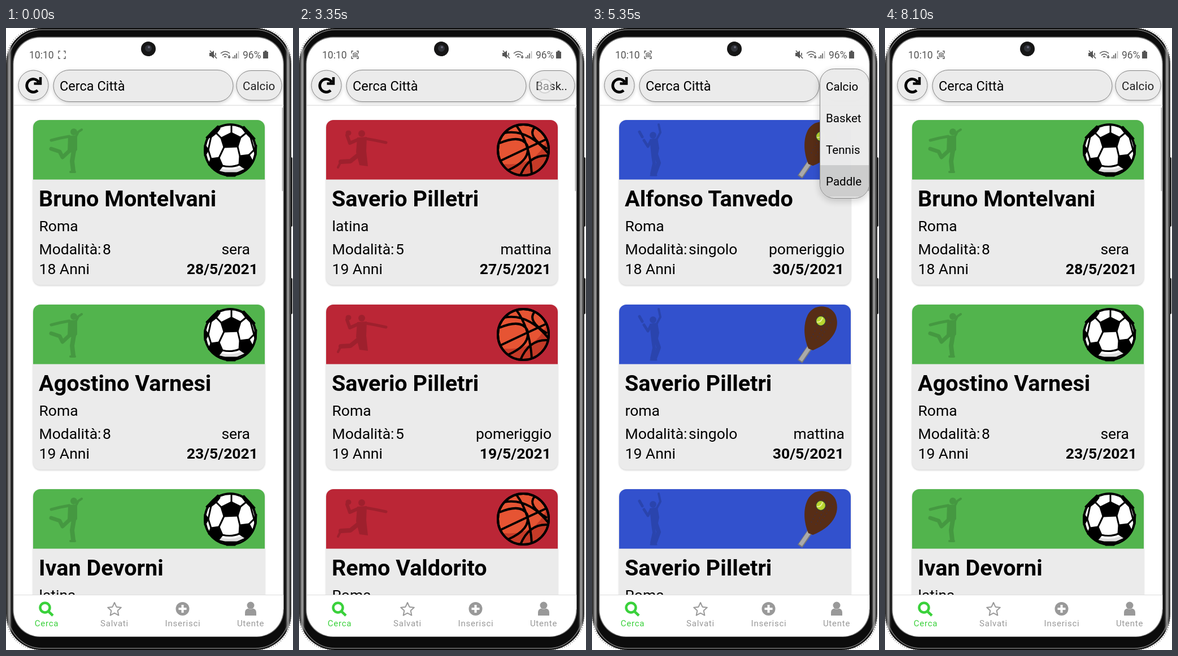
Animation of 508 by 1102 pixels, one loop 8.15 s. Source, as an HTML page:

```html
<!DOCTYPE html>
<html lang="it">
<head>
<meta charset="utf-8">
<style>
  html, body { margin: 0; width: 100%; height: 100%; overflow: hidden; background: #fff; }
  svg { display: block; width: 100vw; height: 100vh; font-family: Roboto, sans-serif; }
  .pill { fill: #ebebeb; stroke: #858585; filter: drop-shadow(0 2px 3px #0003); }
  .card { fill: #ebebeb; filter: drop-shadow(0 1.5px 1.5px #0003); }
  .name { font: 700 39.6px Roboto, sans-serif; }
  .info { font-size: 26.5px; }
  .date { font-weight: 700; }
  .item { font-size: 20.6px; }
  .tab { font-size: 15px; letter-spacing: .75px; text-anchor: middle; }
  .fig { stroke-linecap: round; stroke-linejoin: round; }
  .end { text-anchor: end; }
</style>
</head>
<body>
<svg id="stage" viewBox="0 0 508 1102"></svg>
<script>
const LOOP = 8150;

// Silhouettes: head, torso and [width, limb] strokes
const figure = (head, torso, ...limbs) =>
  `<g class="fig" opacity=".15"><circle cx="${head[0]}" cy="${head[1]}" r="6"/><path d="${torso}"/>` +
  limbs.map(([w, d]) => `<path d="${d}" fill="none" stroke="#000" stroke-width="${w}"/>`).join('') + '</g>';

const soccerBall = `<g transform="translate(397 216)">
  <circle r="47"/><circle r="43" fill="#fff"/>
  <path d="M-36 24Q0 48 38 20Q28 43 0 43Q-27 43-36 24z" fill="#ddd"/>
  <g stroke="#000" stroke-width="3" stroke-linejoin="round">
  <path d="M-16-21 2-30 18-22 13-6-11-5z M-20 14-14 28-22 38-38 26-34 16z M17 11 33 9 39 20 28 34 16 26z
    M-25-30-34-23-42-22-22-42-19-38z M28-30 36-22 43-20 24-41 22-38z M-45-8-39 0-45 10z M46-8 42 0 45 9z M-10 41 12 41 8 46-6 46z"/>
  <path fill="none" d="M-16-21-25-30M18-22 28-30M2-30V-45M-11-5-20 14M13-6 17 11M-14 28Q2 32 16 26M-34 16-39 0-34-23M33 9 42 0 36-22M-22 38-10 41M28 34 12 41"/></g></g>`;

const basketBall = `<g transform="translate(397 216)" fill="none" stroke="#000" stroke-width="4">
  <circle r="45" fill="#e65433"/>
  <path d="M41-17A44 44 0 0 1-36 25Q22 30 41-17z" fill="#c53a27" stroke="none"/>
  <path d="M-42 20Q0 0 41-19M-12-43Q12-10 15 43M-42-12Q-4-28 7-8Q14 18-27 36M-34-30Q8-38 44 6M20-40Q6-24 42-2M-5 45Q10 8 44 10"/>
  <circle r="45"/></g>`;

const tennisBall = (x, y) => `<circle cx="${x}" cy="${y}" r="8.5" fill="#b9d62f" stroke="#343" stroke-width="1.2"/>
  <path d="M${x - 7} ${y + 2}q8 1 10-8" fill="none" stroke="#eef5b0" stroke-width="1.5"/>`;

const racket = `<g transform="translate(409 198) rotate(28)" fill="none">
  <path d="M-17 18 0 46 17 18" stroke="#858788" stroke-width="6"/>
  <ellipse rx="21" ry="28" fill="url(#strings)" stroke="#858788" stroke-width="5"/>
  <path d="M-21-3A21 28 0 0 1 21-3" stroke="#29ae9b" stroke-width="5"/>
  <path d="M0 42V50" stroke="#858788" stroke-width="8"/>
  <path d="M0 49V77" stroke="#263f91" stroke-width="10"/>
  <path d="M0 50V76" stroke="#416bd0" stroke-width="9" stroke-dasharray="4 2"/></g>` + tennisBall(408, 189);

const paddle = `<path d="M388 235 368 264" stroke="#777" stroke-width="10"/>
  <path d="M386 237 369 262" stroke="#aaa" stroke-width="7"/>
  <path d="M383 241C375 222 373 199 382 181C393 161 421 162 431 181C441 206 424 231 391 244z" fill="#572d16"/>
  <path d="M388 222 414 174M396 226 422 180M404 223 428 187" stroke="#35304f" stroke-width="1.5" stroke-dasharray="1.5 5"/>` + tennisBall(405, 192);

// Cards: name, city, mode, time of day, age, date
const sports = [
  { label: 'Calcio', color: '#52b44d', art: soccerBall,
    fig: figure([120, 184], 'M110 191 126 190 126 216 121 222 109 219z',
      [5, 'M112 192 96 195 80 199'], [4, 'M124 192 128 184 134 180'],
      [8, 'M120 218 117 236 119 253'], [7, 'M113 217 100 229 95 219 80 214'], [4, 'M114 255H122']),
    cards: [['Bruno Montelvani', 'Roma', '8', 'sera', '18 Anni', '28/5/2021'],
      ['Agostino Varnesi', 'Roma', '8', 'sera', '19 Anni', '23/5/2021'], ['Ivan Devorni', 'latina']] },
  { label: 'Bask..', color: '#bb2636', art: basketBall,
    fig: figure([111, 187], 'M103 194 120 193 119 218 122 245 107 243 101 220z',
      [6, 'M106 197 90 204 85 190'], [9, 'M87 186h1'], [5, 'M118 196 135 199 154 203'],
      [8, 'M106 224 91 236 74 237'], [4, 'M74 237 69 247']),
    cards: [['Saverio Pilletri', 'latina', '5', 'mattina', '19 Anni', '27/5/2021'],
      ['Saverio Pilletri', 'Roma', '5', 'pomeriggio', '19 Anni', '19/5/2021'], ['Remo Valdorito', 'Roma']] },
  { label: 'Tenn..', color: '#cb6e2e', art: racket,
    fig: figure([107, 190], 'M95 197 111 196 112 217 108 229 92 224z',
      [5, 'M97 199 87 207 77 192'], [5, 'M110 200 115 214 132 217'], [1.5, 'M133 217a7 5 0 1 1 13-1a7 5 0 1 1-13 1M134 215H145'],
      [8, 'M97 222 86 235 70 239'], [5, 'M70 239 64 250'], [8, 'M105 222 117 234 124 249'], [4, 'M122 251h8']),
    cards: [['Ettore Grandovesi', 'Roma', 'singolo', 'mattina', '18 Anni', '29/5/2021'],
      ['Salvatore Mevadi', 'Milano', 'singolo', 'pomeriggio', '0', '19/5/2021']] },
  { label: 'Padd..', color: '#3251cd', art: paddle,
    fig: figure([108, 190], 'M102 197 116 195 119 213 116 228 105 226z',
      [5, 'M104 200 99 210 92 199'], [5, 'M84 184 89 193'], [4, 'M114 198 121 185 118 171'],
      [8, 'M113 224 118 239 111 258'], [6, 'M108 226 110 240 106 258'], [3, 'M104 261h10']),
    cards: [['Alfonso Tanvedo', 'Roma', 'singolo', 'pomeriggio', '18 Anni', '30/5/2021'],
      ['Saverio Pilletri', 'roma', 'singolo', 'mattina', '19 Anni', '30/5/2021'], ['Saverio Pilletri', 'Roma']] },
];

const text = (x, y, cls, s) => `<text x="${x}" y="${y}" class="${cls}">${s}</text>`;

const card = (sport, [name, city, mode = '', part = '', age = '', date = ''], i) => `<g transform="translate(0 ${327 * i})">
  <rect class="card" x="48" y="163" width="410" height="292.5" rx="13"/>
  <path d="M48 268.5V176a13 13 0 0 1 13-13H445a13 13 0 0 1 13 13V268.5z" fill="${sport.color}"/>
  ${sport.fig}${sport.art}
  ${text(58, 316, 'name', name)}${text(58.5, 360, 'info', city)}
  ${text(58.5, 401, 'info', 'Modalità:')}${text(171, 401, 'info', mode)}${text(58.5, 436, 'info', age)}
  ${text(part === 'sera' ? 432 : 447, 401, 'info end', part)}${text(446, 436, 'info date end', date)}</g>`;

const star = Array.from({ length: 10 }, (_, k) => {
  const a = k * Math.PI / 5, r = k % 2 ? 6 : 12.5;
  return `${192 + r * Math.sin(a)},${1030.5 - r * Math.cos(a)}`;
}).join(' ');

const ring = (x, y, w, h, r, fill) => `<rect x="${x}" y="${y}" width="${w}" height="${h}" rx="${r}" fill="${fill}"/>`;

// Metal edge: the same shading mirrored on both sides
const edge = [[0, '#2a2a2a'], [3, '#4a4a4a'], [5, '#a8a8a8'], [7, '#8a8a8a'], [9.5, '#222'], [12, '#0c0c0c']];
const edgeStops = edge.map(([x, c]) => `<stop offset="${x / 252.5}" stop-color="${c}"/>`).join('');

const phone = `
  <rect x="1" y="1" width="503" height="1100" rx="56" fill="none" stroke="#777" stroke-width="2" stroke-dasharray="1 3"/>
  ${ring(501, 229, 6, 123, 2, '#181818')}${ring(501, 443, 6, 64, 2, '#181818')}
  ${ring(0, 0, 505, 1102, 64, 'url(#metal)')}
  <rect x="4" y="3" width="497" height="1096" rx="60" fill="none" stroke="#777" stroke-width="1.5"/>
  ${ring(12, 15.5, 480, 1063.5, 48, '#777')}${ring(13.5, 17, 477, 1061, 47, '#fff')}
  <circle cx="252" cy="37" r="13" fill="#161616"/><circle cx="252" cy="36" r="6" fill="#303238"/><circle cx="253" cy="34" r="2" fill="#667"/>`;

const status = `<g fill="#555" font-size="17.5">
  <text x="41" y="54">10:10</text><text x="419" y="54">96%</text>
  <path d="M455 42h2.5v-2h4v2H464V54H455z"/>
  <path d="M360 44h3l5-4V54l-5-4h-3z"/>
  <g fill="none" stroke="#555" stroke-width="1.6">
    <path d="M361 40 373 54M371 44v5"/>
    <path d="M380 45Q388 38 396 45M383 48.5Q388 44 393 48.5M386 51.5Q388 50 390 51.5M395 48v6M392.5 51.5h5"/>
    <path d="M402 54v-3M405 54v-6M408 54v-9"/><path d="M411.5 54V41" stroke="#bbb"/>
    <path d="M93 45v-4h3M102 41h3v4M105 50v4h-3M96 54h-3v-4" stroke-width="1.3"/>
    <path id="shot" d="M96 45h1.5l1-1h2l1 1H103v6H96zM98 48a1.5 1.5 0 1 0 3 0a1.5 1.5 0 1 0-3 0" stroke-width="1.2"/>
  </g></g>`;

const header = `<path d="M14 137H491" stroke="#e9e9e9" stroke-width="2"/>
  <circle class="pill" cx="48.5" cy="101.5" r="26.5"/>
  <g fill="none" stroke="#000"><path d="M58 96A11.5 11.5 0 1 0 56 110.5" stroke-width="4.8"/><path d="M61 87V98.5H49.5" stroke-width="4.5"/></g>
  <rect class="pill" x="84" y="74.5" width="318" height="56" rx="28"/><text x="95" y="111" font-size="23.5">Cerca Città</text>
  <rect class="pill" x="408" y="75.5" width="80" height="52.5" rx="26"/>
  <text id="chosen" x="419" y="109.5" font-size="20.6" fill="#222"></text>
  <circle id="touch" cx="435" cy="103" r="12" fill="#fff9" stroke="#ccc" stroke-width="2"/>`;

const tabs = `<rect x="14" y="1004" width="477" height="26" fill="#fff"/><path d="M14 1004.5H491" stroke="#ddd"/>
  <g fill="#999">
  <g fill="#3ad13b">${text(72, 1060, 'tab', 'Cerca')}
    <path d="M74.5 1033 83 1041M60.5 1027a8.5 8.5 0 1 0 17 0a8.5 8.5 0 1 0-17 0" fill="none" stroke="#3ad13b" stroke-width="4.5"/></g>
  ${text(192, 1060, 'tab', 'Salvati')}<polygon points="${star}" fill="none" stroke="#999" stroke-width="2" stroke-linejoin="round"/>
  ${text(313, 1060, 'tab', 'Inserisci')}<circle cx="312.5" cy="1029" r="12"/><path d="M305.5 1029h14M312.5 1022v14" stroke="#fff" stroke-width="4"/>
  ${text(433, 1060, 'tab', 'Utente')}<circle cx="433" cy="1023" r="6.5"/><path d="M423 1041V1036Q423 1029 429 1028.5Q433 1031 437 1028.5Q443 1029 443 1036V1041z"/></g>`;

const menu = `<g id="menu"><rect class="pill" x="403.5" y="72.5" width="87" height="229" rx="25" style="filter:drop-shadow(0 4px 7px #0003)"/>
  <rect id="pick" x="404" y="0" width="86" height="56" fill="#cdcdcd" clip-path="url(#menuClip)"/>
  ${['Calcio', 'Basket', 'Tennis', 'Paddle'].map((s, i) => text(414, 111 + 56 * i, 'item', s)).join('')}</g>`;

stage.innerHTML = `<defs>
  <linearGradient id="metal" gradientUnits="userSpaceOnUse" x1="0" x2="252.5" spreadMethod="reflect">${edgeStops}</linearGradient>
  <clipPath id="list"><rect x="14" y="138" width="477" height="866"/></clipPath>
  <clipPath id="menuClip"><rect x="404" y="73" width="86" height="228" rx="24.5"/></clipPath>
  <pattern id="strings" width="4" height="4" patternUnits="userSpaceOnUse" patternTransform="rotate(17)">
    <rect width="4" height="4" fill="#cb6e2e"/><path d="M0 1H4M1 0V4" stroke="#f3e3d7" stroke-width="1.3"/></pattern></defs>
  ${phone}${status}
  <g clip-path="url(#list)">${sports.map((s, i) => `<g id="sport${i}">${s.cards.map((c, k) => card(s, c, k)).join('')}</g>`).join('')}
  <rect x="488.5" y="141" width="2.5" height="148" rx="1" fill="#b5b5b5"/></g>
  ${header}${tabs}${menu}`;

const $ = id => document.getElementById(id);
const clamp = v => Math.max(0, Math.min(1, v));

// Each visit to the menu: opening, press, list change, closing, chosen sport
const visits = [
  { open: 1000, press: 1400, change: 1600, close: 1600, sport: 1 },
  { open: 3450, press: 3900, change: 4100, close: 4100, sport: 2 },
  { open: 4700, press: 5100, change: 5300, close: 5350, sport: 3 },
  { open: 6600, press: 6950, change: 7250, close: 7250, sport: 0 },
];

function draw(t) {
  const current = visits.reduce((s, v) => t >= v.change ? v.sport : s, 0);
  sports.forEach((_, i) => $('sport' + i).style.display = i === current ? '' : 'none');
  $('chosen').textContent = sports[current].label;
  const visit = visits.find(v => t >= v.open && t < v.close + 150);
  $('menu').style.display = visit ? '' : 'none';
  if (visit) {
    $('menu').style.opacity = Math.min(clamp((t - visit.open + 50) / 150), clamp(1 - (t - visit.close) / 150));
    $('pick').setAttribute('y', 75 + 56 * visit.sport);
    $('pick').style.opacity = clamp((t - visit.press) / 100);
  }
  $('touch').style.opacity = visits.some(v => t >= v.open - 200 && t < v.open) ? .8 : 0;
  const blink = t % 1500;
  $('shot').style.display = blink >= 50 && blink < 1000 ? '' : 'none';
}

const start = performance.now();
function tick() {
  draw((performance.now() - start) % LOOP);
  requestAnimationFrame(tick);
}
tick();
</script>
</body>
</html>
```
